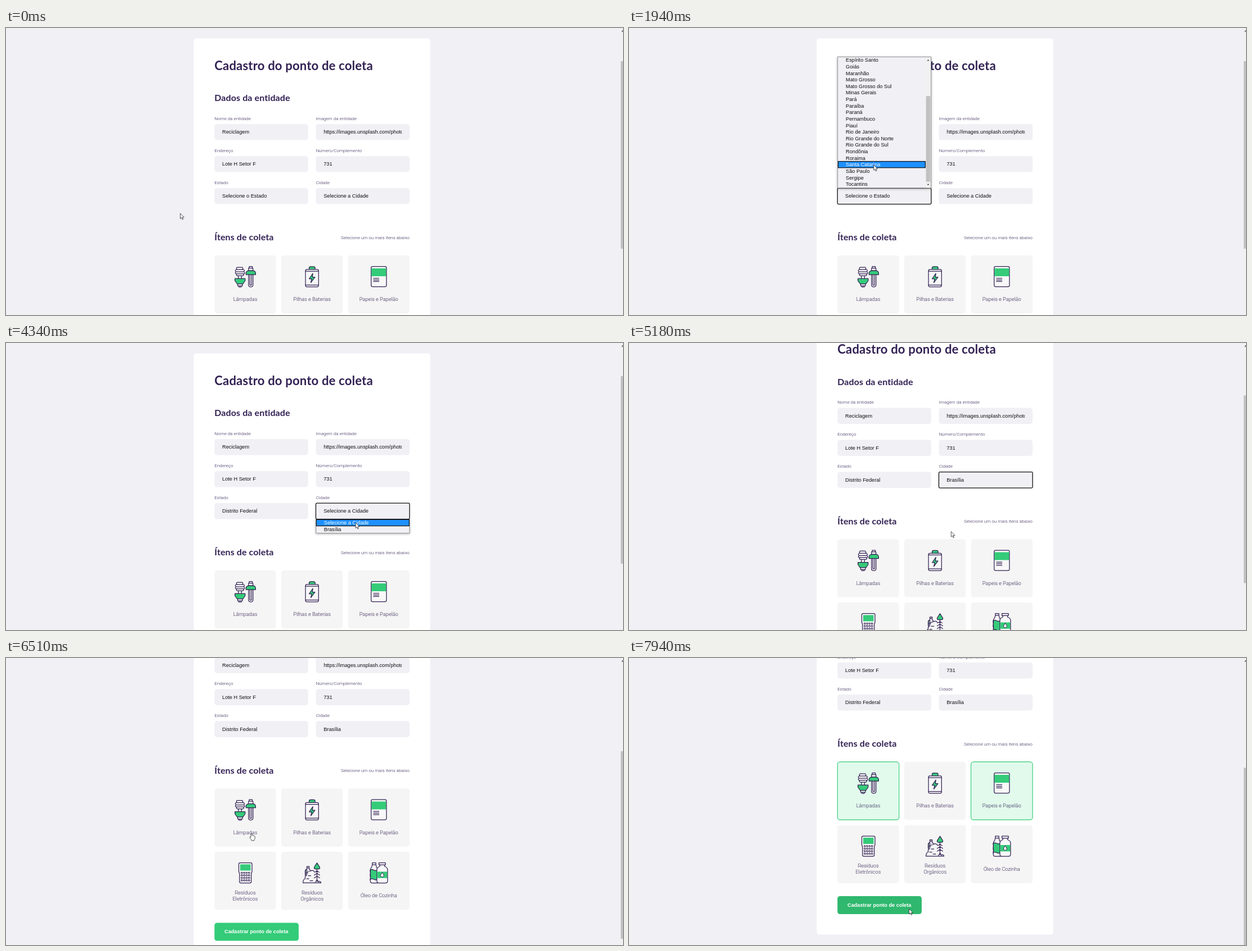
An HTML page that plays this animation: 1096 px wide and 511 px high, repeating every 8000 ms.

```html
<!DOCTYPE html>
<html lang="pt-BR">
<head>
<meta charset="utf-8">
<title>Cadastro do ponto de coleta</title>
<style>
  html, body { margin: 0; width: 100%; height: 100%; overflow: hidden; background: #f0f0f5; }
  svg { display: block; width: 1096px; height: 511px; }
  text { white-space: pre; }
  .h1, .h2 { font-family: Lato, "Open Sans", sans-serif; font-weight: 700; fill: #322153; }
  .h1 { font-size: 22px; letter-spacing: .2px; }
  .h2 { font-size: 16px; letter-spacing: .1px; }
  .label { font: 300 8.05px Roboto, sans-serif; fill: #322153; }
  .item { font: 300 9.2px Roboto, sans-serif; fill: #322153; text-anchor: middle; }
  .input { font: 9.2px "Liberation Sans", Arial, sans-serif; fill: #111; }
  .button { font: bold 9.2px "Liberation Sans", Arial, sans-serif; fill: #fff; }
  .field { fill: #f0f0f5; }
  .focus { fill: none; stroke: #101010; stroke-width: 1.3; }
  .card { fill: #f5f5f5; }
  .card.on { fill: #e1faec; stroke: #34cb79; stroke-width: 1.15; }
  .icon { fill: none; stroke: #322153; stroke-width: 1.25; stroke-linejoin: round; stroke-linecap: round; }
  .icon .g { fill: #34cb79; }
  .icon .w { fill: #f8f8f8; }
  .icon .flat { fill: #34cb79; stroke: none; }
  .popup { fill: #f0f0f5; stroke: #858585; stroke-width: .8; filter: drop-shadow(0 1.5px 2px rgba(0,0,0,.35)); }
  .pick { fill: #1e90ff; stroke: #101010; stroke-width: 1.2; }
  .pointer { fill: #fff; stroke: #111; stroke-width: .7; stroke-linejoin: round; }
</style>
</head>
<body>
<svg viewBox="0 0 1096 511">
  <defs>
    <clipPath id="listClip"><rect x="371" y="51.8" width="165" height="232.8"/></clipPath>
    <clipPath id="urlClip"><rect x="564" y="171" width="139.2" height="28"/></clipPath>
  </defs>

  <g id="page">
    <rect x="333.5" y="18.5" width="420" height="694" rx="4.6" fill="#fff"/>
    <text class="h1" x="370.3" y="75">Cadastro do ponto de coleta</text>
    <text class="h2" x="370.3" y="130.4">Dados da entidade</text>
    <g id="fields"></g>
    <rect id="stateFocus" class="focus" x="370.3" y="285.2" width="166.5" height="28.4" rx="1.8"/>
    <rect id="cityFocus" class="focus" x="550.4" y="285.2" width="166.5" height="28.4" rx="1.8"/>
    <text class="h2" x="370.3" y="378.4">Ítens de coleta</text>
    <text class="label" x="716.8" y="375.9" text-anchor="end">Selecione um ou mais itens abaixo</text>
    <g id="cards"></g>

    <g class="icon">
      <!-- lamps -->
      <path class="w" d="M410.5 426H419.5Q422 428 419.5 430H410.5Q408 428 410.5 426ZM409 430H422Q425 432 422 434H409Q405.5 432 409 430ZM409 434H422Q426 436 423 437.5H409Q405.5 436 409 434ZM410.5 437.5H421Q424 439 421 441H411Q407.5 439.5 410.5 437.5ZM412.8 441V446M418.3 441V446"/>
      <path class="g" d="M406.7 446.2H424.8V450L421 455.5H410.5L406.7 450Z"/>
      <path d="M411.5 455.5V459H420V455.5M413.5 459V461H418V459"/>
      <path class="w" d="M432 424.6H437.5V427.5H432ZM430.8 427.5H438.7V432H430.8ZM430.8 439V457Q430.8 461 434.8 461T438.8 457V439M433.3 439.5V457Q434.8 459 436.3 457V439.5"/>
      <path class="g" d="M426.4 439.2V437Q426.4 432 432 432H438Q443.4 432 443.4 437V439.2Z"/>
      <!-- battery -->
      <path class="g" d="M538.5 430V427Q538.5 424.8 541 424.8H546.5Q549 424.8 549 427V430"/>
      <rect class="w" x="532" y="429.8" width="23.2" height="31" rx="2.5"/>
      <path d="M532 433H555M532 457.6H555"/>
      <path class="g" d="M545 437L538.5 446.5H543L541.5 453.5L548.8 443.6H544.3Z"/>
      <!-- paper -->
      <rect class="w" x="648.6" y="424.6" width="27.2" height="36" rx="2.5"/>
      <path class="flat" d="M649.2 428H675.2V442H649.2Z"/>
      <path d="M652.8 445.6H662.5M652.8 448.5H662.5M652.8 451.4H662.5"/>
    </g>

    <g class="icon" transform="translate(0 172.5)">
      <!-- calculator -->
      <path class="w" d="M416 364.6H434.5Q437 364.6 437 367V380L435.7 384V398Q435.7 400.6 433 400.6H417.5Q414.8 400.6 414.8 398V384L413.5 380V367Q413.5 364.6 416 364.6Z"/>
      <path class="flat" d="M416 367.4H434.5V378.5H416Z"/>
      <g id="keys" stroke-width="1"></g>
      <!-- organic waste -->
      <path class="g" d="M552.4 364.8L547.5 372.5Q547 375.6 549.5 375.6H555.3Q558 375.6 557.3 372.5Z"/>
      <path d="M552.4 375.6V398M548.7 381.5L552.4 379L556.2 381.5M547.5 386.5L552.4 383.5L557.3 386.5M547.5 391.5L552.4 388.5L557.3 391.5M549.5 399L552.4 395L555.5 399"/>
      <path class="g" d="M531.5 386V379Q531.5 376.5 534.5 376V381Z"/>
      <path class="w" d="M534.5 371H538.5V373.5H534.5ZM534.5 373.5V376Q532 377 532 379V388M538.5 373.5V376L541 378"/>
      <path d="M527.5 400.4Q527.5 394 531.5 393Q530.5 388 534 387Q534.5 380 540 379.5Q546 376.5 548 381M537 387.5H541.5M534 393H538M540 396.5H545M527.5 400.4H559.5Q559.5 397.5 556 397.5"/>
      <!-- bottles -->
      <path class="w" d="M650.7 364.6H657V368H650.7ZM650.7 368Q650.3 372 647.8 375Q646 379 647.5 383Q646.2 387 647.5 391Q645.8 400.6 650 400.6H660V376Q657.5 372 657 368"/>
      <path class="g" d="M647 377.5Q650 375.8 653 377.5T660 377.5V394Q656 396 653 394T647 394.5Q648 391 647.5 388Q646.5 385 647.5 382Z"/>
      <path class="w" d="M662.5 364.6H674V368.3H662.5ZM664 368.3V371Q658.8 373 658.8 377V397Q658.8 400.6 662.5 400.6H674Q677.8 400.6 677.8 397V377Q677.8 373 672.5 371V368.3"/>
      <path class="flat" d="M659.4 380.5H677.2V391.8H659.4Z"/>
      <path class="w" stroke-width="1" d="M668.3 382Q665 386 665.3 387.5Q666 390 668.3 390T671.3 387.5Q671.5 386 668.3 382Z"/>
    </g>

    <rect id="button" x="370.3" y="644" width="149.6" height="32" rx="4.6"/>
    <text class="button" x="388" y="662.7">Cadastrar ponto de coleta</text>
  </g>

  <rect x="1092" width="4" height="511" fill="#f1f1f1"/>
  <path d="M1093 6.5L1096 3.5V6.5Z" fill="#505050"/>
  <rect id="thumb" x="1092" width="4" height="334" fill="#c1c1c1"/>

  <g id="stateList">
    <rect class="popup" x="370.7" y="51.4" width="165.8" height="233.5"/>
    <g clip-path="url(#listClip)"><g id="states"></g></g>
    <rect x="527.3" y="52" width="8.6" height="232.5" fill="#f1f1f1"/>
    <rect id="listThumb" x="527.6" width="7.6" height="152.5" fill="#c1c1c1"/>
    <path id="listUp" d="M529.3 58.5L531.4 56L533.5 58.5Z"/>
    <path d="M529.3 277.8L531.4 280.3L533.5 277.8Z" fill="#505050"/>
  </g>
  <g id="cityList">
    <rect class="popup" x="550.8" y="314.2" width="166" height="24.2"/>
    <g id="cities"></g>
  </g>

  <path id="arrow" class="pointer" d="M0 0V9.5L2.2 7.5L3.7 11L5.2 10.4L3.7 7H6.8Z"/>
  <path id="hand" class="pointer" d="M-1 6.5V.9Q-1-.2 0-.2T1 .9V4Q2.8 3.4 3 4.4Q4.6 4 4.8 5Q6.2 4.9 6.2 6.2V9Q6 10.5 5 11.5V13H0V11.8L-3 7.8Q-3.3 6.6-2.2 6.3Q-1.5 6.4-1 7.3Z"/>
</svg>

<script>
const LOOP = 8000, ROW = 11.63, LIST_TOP = 51.2, CITY_TOP = 314.2;
const $ = id => document.getElementById(id);
const show = (id, on) => { $(id).style.display = on ? '' : 'none'; };
const move = (id, x, y) => $(id).setAttribute('transform', `translate(${x} ${y})`);

const states = ['Selecione o Estado', 'Acre', 'Alagoas', 'Amapá', 'Amazonas', 'Bahia', 'Ceará',
  'Distrito Federal', 'Espírito Santo', 'Goiás', 'Maranhão', 'Mato Grosso', 'Mato Grosso do Sul',
  'Minas Gerais', 'Pará', 'Paraíba', 'Paraná', 'Pernambuco', 'Piauí', 'Rio de Janeiro',
  'Rio Grande do Norte', 'Rio Grande do Sul', 'Rondônia', 'Roraima', 'Santa Catarina',
  'São Paulo', 'Sergipe', 'Tocantins'];
const cities = ['Selecione a Cidade', 'Brasília'];

const fields = [
  ['Nome da entidade', 'Reciclagem'], ['Imagem da entidade', 'https://images.unsplash.com/photo-1'],
  ['Endereço', 'Lote H Setor F'], ['Número/Complemento', '731'],
  ['Estado', states[0]], ['Cidade', cities[0]]
];
$('fields').innerHTML = fields.map(([label, value], i) => {
  const x = i % 2 ? 550.4 : 370.3, y = 171 + 57 * (i >> 1);
  const clip = i === 1 ? 'clip-path="url(#urlClip)"' : '';
  return `<text class="label" x="${x}" y="${y - 7.1}">${label}</text>
    <rect class="field" x="${x}" y="${y}" width="166.5" height="28.6" rx="4.6"/>
    <text class="input" id="value${i}" ${clip} x="${x + 13.8}" y="${y + 17.3}">${value}</text>`;
}).join('');

const cardNames = [['Lâmpadas'], ['Pilhas e Baterias'], ['Papeis e Papelão'],
  ['Resíduos', 'Eletrônicos'], ['Resíduos', 'Orgânicos'], ['Óleo de Cozinha']];
const cards = cardNames.map((lines, i) => ({ lines, x: 370.3 + 118.6 * (i % 3), y: i < 3 ? 404.8 : 517.5 }));
$('cards').innerHTML = cards.map(({ lines, x, y }, i) =>
  `<rect class="card" id="card${i}" x="${x}" y="${y}" width="109.4" height="103.4" rx="4.6"/>` +
  lines.map((line, n) => `<text class="item" x="${x + 54.7}" y="${
    y + 81.4 + (n - (lines.length - 1) / 2) * 11}">${line}</text>`).join('')).join('');

$('keys').innerHTML = Array.from({ length: 16 }, (_, i) =>
  `<rect x="${417.6 + 4.3 * (i % 4)}" y="${381.5 + 4.5 * (i >> 2)}" width="2.7" height="2.2" rx=".4"/>`).join('');

function fillList(id, names, x, top, width) {
  $(id).innerHTML = `<rect class="pick" x="${x}" width="${width}" height="${ROW - .4}"/>` +
    names.map((name, i) =>
      `<text class="input" x="${x + 13.6}" y="${top + ROW * i + 9}">${name}</text>`).join('');
}
fillList('states', states, 371.5, LIST_TOP, 154.8);
fillList('cities', cities, 551.2, CITY_TOP, 165);

function pick(id, index, top) {
  const [bar, ...rows] = $(id).children;
  bar.setAttribute('y', top + ROW * index + .2);
  rows.forEach((row, i) => { row.style.fill = i === index ? '#fff' : ''; });
}

// Keys are [time, ...values], eased between neighbours.
function track(keys, t) {
  let i = keys.length - 1;
  while (i > 0 && keys[i][0] > t) i--;
  const a = keys[i], b = keys[i + 1];
  if (!b) return a.slice(1);
  const u = (t - a[0]) / (b[0] - a[0]), e = u * u * (3 - 2 * u);
  return a.slice(1).map((v, n) => v + (b[n + 1] - v) * e);
}

const pointerKeys = [
  [0, 309.5, 330], [40, 309.5, 330], [340, 440, 287], [550, 440, 287], [800, 421, 266],
  [1360, 421, 266], [1380, 421, 267], [1650, 421, 267], [1780, 428, 279], [2240, 452, 154],
  [2620, 452, 154], [3140, 430, 138], [3340, 430, 138], [3880, 652, 297], [4060, 652, 297],
  [4320, 621, 320], [4420, 621, 320], [4680, 600, 329], [4880, 600, 329], [5560, 533, 345],
  [5720, 533, 345], [6460, 436, 312], [6600, 436, 312], [7000, 655, 300], [7100, 655, 300],
  [7350, 503, 445], [7450, 503, 445], [7900, 497.5, 446.5]
];
const pageKeys = [[0, 0], [5030, 0], [5200, 57.5], [5300, 57.5], [5470, 115], [5565, 115],
  [5735, 172.5], [7400, 172.5], [7570, 220]];
const listKeys = [[0, 0], [820, 0], [980, 57.5], [995, 57.5], [1100, 93], [2280, 93],
  [2410, 35.5], [2430, 35.5], [2560, 0]];

// The highlight waits for the mouse to move again after a wheel scroll.
function hoveredState(t) {
  if (t >= 800 && t < 1380) t = 800;
  if (t >= 2240 && t < 2620) t = 2240;
  const y = track(pointerKeys, t)[1];
  return y > 284 ? 0 : Math.floor((y - LIST_TOP + track(listKeys, t)[0]) / ROW);
}

function draw(t) {
  const [x, y] = track(pointerKeys, t);
  const [scroll] = track(pageKeys, t);
  const [listScroll] = track(listKeys, t);
  const listOpen = t >= 350 && t < 3340, cityOpen = t >= 4060 && t < 4790;
  const inside = (left, top, w, h) =>
    x >= left && x <= left + w && y + scroll >= top && y + scroll <= top + h;

  move('page', 0, -scroll);
  $('thumb').setAttribute('y', 59 + scroll * .62);

  show('stateList', listOpen);
  move('states', 0, -listScroll);
  pick('states', hoveredState(t), LIST_TOP);
  $('listThumb').setAttribute('y', 62 + listScroll * .637);
  $('listUp').setAttribute('fill', listScroll > 0 ? '#505050' : '#a3a3a3');

  show('cityList', cityOpen);
  pick('cities', y > CITY_TOP + ROW ? 1 : 0, CITY_TOP);

  show('stateFocus', t >= 350 && t < 4060);
  show('cityFocus', t >= 4060 && t < 6500);
  $('value4').textContent = states[t < 3340 ? 0 : 7];
  $('value5').textContent = cities[t < 4790 ? 0 : 1];

  $('card0').classList.toggle('on', t >= 6560);
  $('card2').classList.toggle('on', t >= 7050);
  $('button').setAttribute('fill', inside(370.3, 644, 149.6, 32) ? '#2fb86e' : '#34cb79');

  const overCard = !listOpen && !cityOpen && cards.some(c => inside(c.x, c.y, 109.4, 103.4));
  show('hand', overCard);
  show('arrow', !overCard);
  move(overCard ? 'hand' : 'arrow', x, y);
}

function tick() {
  draw(performance.now() % LOOP);
  requestAnimationFrame(tick);
}
tick();
</script>
</body>
</html>
```
